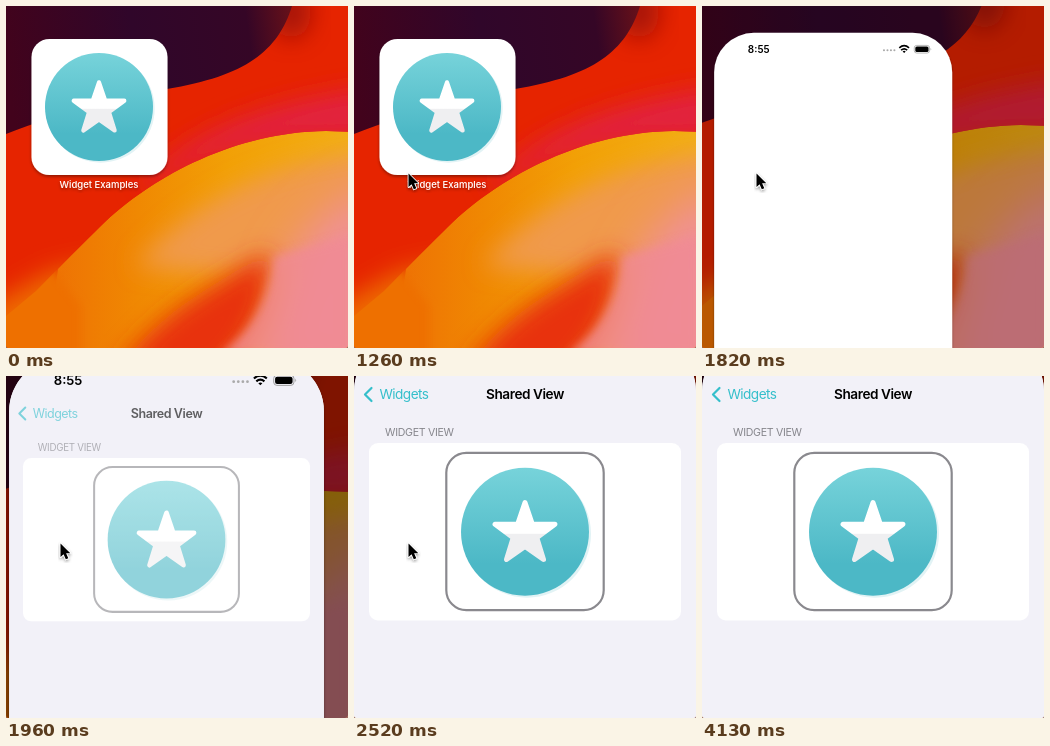
Recreate the animation shown at these times as an HTML page. Size 342 by 342 pixels, loop 5.18 s.

```html
<!DOCTYPE html>
<html lang="en">
<head>
<meta charset="utf-8">
<title>Widget launch</title>
<style>
  html, body { margin: 0; width: 100%; height: 100%; overflow: hidden; background: #77707a; }
  svg { display: block; width: 100vw; height: 100vh; border-radius: 0 0 3px 3px; }
  text { font-family: Inter, "Liberation Sans", sans-serif; }
  .title { font-size: 13.6px; font-weight: 600; letter-spacing: -.45px; }
  .back { font-size: 13.6px; letter-spacing: -.55px; fill: #35bfcb; }
  .section { font-size: 10.6px; letter-spacing: -.3px; fill: #85858b; }
  .clock { font-size: 14.3px; font-weight: 600; }
  .label { font-size: 9.5px; font-weight: 500; fill: #fff; }
</style>
</head>
<body>
<svg viewBox="0 0 342 342">
  <defs>
    <filter id="blur5" x="-50%" y="-50%" width="200%" height="200%"><feGaussianBlur stdDeviation="5"/></filter>
    <filter id="blur12" x="-50%" y="-50%" width="200%" height="200%"><feGaussianBlur stdDeviation="12"/></filter>
    <filter id="blur22" x="-60%" y="-60%" width="220%" height="220%"><feGaussianBlur stdDeviation="22"/></filter>
    <filter id="shadow" x="-20%" y="-20%" width="140%" height="140%">
      <feDropShadow dx="0" dy="1.5" stdDeviation="1.5" flood-opacity=".4"/>
    </filter>
    <linearGradient id="night" gradientUnits="userSpaceOnUse" x1="0" y1="60" x2="285" y2="20">
      <stop offset="0" stop-color="#42031c"/>
      <stop offset=".45" stop-color="#30062a"/>
      <stop offset=".85" stop-color="#350626"/>
      <stop offset="1" stop-color="#64101a"/>
    </linearGradient>
    <linearGradient id="dune" gradientUnits="userSpaceOnUse" x1="40" y1="0" x2="342" y2="0">
      <stop offset="0" stop-color="#ee7004"/>
      <stop offset=".3" stop-color="#f08802"/>
      <stop offset=".6" stop-color="#f2a006"/>
      <stop offset="1" stop-color="#f2ae14"/>
    </linearGradient>
    <linearGradient id="teal" x2="0" y2="1">
      <stop offset="0" stop-color="#77d3da"/>
      <stop offset=".75" stop-color="#4cb8c6"/>
      <stop offset="1" stop-color="#4cb8c6"/>
    </linearGradient>
    <linearGradient id="starFill" x2="0" y2="1">
      <stop offset=".54" stop-color="#fff"/>
      <stop offset=".56" stop-color="#efeff1"/>
    </linearGradient>
    <path id="hill" d="M30 285C48 267 70 244 100 215C150 169 230 126 320 125L350 126V350H0V310Z"/>
    <clipPath id="hillClip"><use href="#hill"/></clipPath>
    <g id="badge">
      <circle cx="2" cy="2" r="64" fill="#e2f3f5"/>
      <circle r="64" fill="url(#teal)"/>
      <path id="star" fill="url(#starFill)" stroke="url(#starFill)" stroke-width="5" stroke-linejoin="round"/>
    </g>
  </defs>

  <g id="wallpaper">
    <rect x="-40" y="-40" width="440" height="440" fill="#e62400"/>
    <path d="M130 182C185 125 250 100 360 82V132C260 130 200 148 150 178Z" fill="#e2203f" filter="url(#blur12)"/>
    <ellipse cx="285" cy="5" rx="20" ry="28" fill="#8a0a10" opacity=".7" filter="url(#blur12)"/>
    <path d="M-40-40H292L286 0C272 45 240 70 161 83C110 92 60 105 0 128L-40 144Z" fill="url(#night)"/>
    <path d="M-60 325L45 265L120 250V400H-60Z" fill="#ee6a06" filter="url(#blur12)"/>
    <g clip-path="url(#hillClip)">
      <path d="M52 263C70 244 85 230 100 215C150 169 230 126 320 125L350 126V350H40Z" fill="url(#dune)"/>
      <path d="M-20 300L45 262L75 300V360H-20Z" fill="#ee7006" filter="url(#blur5)"/>
      <path d="M130 260C180 200 260 155 370 145V270L240 270Z" fill="#f09a4c" filter="url(#blur12)"/>
      <path d="M250 370C275 290 265 225 375 175V380Z" fill="#f0909a" filter="url(#blur22)"/>
      <path d="M110 365C160 300 200 285 262 245C270 300 240 345 210 370Z" fill="#e83208" filter="url(#blur12)"/>
      <path d="M214 348C246 325 262 295 268 250L345 230V350Z" fill="#f08a94" opacity=".8" filter="url(#blur5)"/>
    </g>
  </g>
  <g id="appIcon">
    <rect x="25.5" y="33" width="136" height="136" rx="18" fill="#fff" filter="url(#shadow)"/>
    <use href="#badge" transform="translate(93 101) scale(.844)"/>
    <text class="label" x="93" y="182" text-anchor="middle" filter="url(#shadow)">Widget Examples</text>
  </g>
  <rect id="dim" width="342" height="342"/>

  <g id="app">
    <rect x="0" y="-41" width="342" height="741" rx="57" fill="#fff" filter="url(#shadow)"/>
    <rect id="page" x="0" y="-41" width="342" height="741" rx="57" fill="#f2f1f8"/>
    <text class="clock" x="64" y="-12.7" text-anchor="middle">8:55</text>
    <g fill="#aaa">
      <circle cx="244" cy="-16" r="1.5"/><circle cx="249" cy="-16" r="1.5"/>
      <circle cx="254" cy="-16" r="1.5"/><circle cx="259" cy="-16" r="1.5"/>
    </g>
    <g fill="none" stroke="#000" stroke-width="2.4">
      <path d="M266-19.5Q273-25.5 280-19.5M268.6-16.3Q273-20 277.4-16.3"/>
      <path d="M273-12L270.8-14.4Q273-16 275.2-14.4Z" fill="#000" stroke="none"/>
    </g>
    <rect x="287.5" y="-23" width="22" height="11" rx="3.5" fill="none" stroke="#999"/>
    <rect x="289" y="-21.5" width="19" height="8" rx="2.3"/>
    <path d="M311-19.5q2 2 0 4z" fill="#999"/>
    <g id="content">
      <path d="M17.5 12L11 18.5L17.5 25" fill="none" stroke="#35bfcb" stroke-width="2.2" stroke-linecap="round" stroke-linejoin="round"/>
      <text class="back" x="25.5" y="23.3">Widgets</text>
      <text class="title" x="171" y="23.3" text-anchor="middle">Shared View</text>
      <text class="section" x="31" y="59.8">WIDGET VIEW</text>
    </g>
    <rect x="15" y="67" width="312" height="177.5" rx="9" fill="#fff"/>
    <g id="widget">
      <rect x="92.3" y="76.8" width="157.4" height="157.4" rx="20" fill="#fff" stroke="#8a898e" stroke-width="2.2"/>
      <use href="#badge" x="171" y="155.7"/>
    </g>
  </g>

  <path id="cursor" d="M0 0V13.6L3.1 10.7L5.3 15.8L7.8 14.7L5.6 9.8H9.8Z" stroke="#fff" stroke-width="1.6" paint-order="stroke" stroke-linejoin="round" filter="url(#shadow)"/>
</svg>
<script>
const LOOP = 5180, STEP = 70, LAUNCH = 1820, SETTLED = 2520;
const get = id => document.getElementById(id);
const clamp = v => Math.min(1, Math.max(0, v));
const mix = (a, b, k) => a + (b - a) * k;
const show = (id, on) => get(id).setAttribute('visibility', on ? 'visible' : 'hidden');
const place = (id, x, y, s = 1) => get(id).setAttribute('transform', `translate(${x} ${y}) scale(${s})`);
const fade = (id, v) => get(id).setAttribute('opacity', v);

const corners = Array.from({ length: 10 }, (_, i) => {
  const r = i % 2 ? 12.4 : 31.5, a = i * Math.PI / 5;
  return `${r * Math.sin(a)} ${2.3 - r * Math.cos(a)}`;
});
get('star').setAttribute('d', `M${corners.join('L')}Z`);

const REST = [54.5, 167.5], ENTRY = [256, 317], EXIT = [149, 318];

function drawCursor(t) {
  show('cursor', t >= 350 && t < 4130);
  const arriving = 1 - (1 - clamp((t - 350) / 420)) ** 2;
  const leaving = clamp((t - 3780) / 280) ** 1.4;
  const [from, to, k] = t < 3850 ? [ENTRY, REST, arriving] : [REST, EXIT, leaving];
  place('cursor', mix(from[0], to[0], k), mix(from[1], to[1], k));
}

function drawLaunch(t) {
  const open = t >= LAUNCH;
  show('app', open);
  show('appIcon', !open);
  const n = (t - LAUNCH) / STEP;
  const gap = t >= SETTLED ? 0 : 0.304 * 0.513 ** n;
  const drop = t >= SETTLED ? 0 : 55.4 * 0.607 ** n;
  if (open) place('app', 40 * gap, drop, 1 - gap);
  const content = clamp((t - LAUNCH) / 230);
  fade('page', clamp((t - LAUNCH) / 140));
  fade('content', content);
  fade('widget', content);
  fade('dim', open ? Math.min(0.5, 0.22 + 0.115 * n) : 0);
  if (open) place('wallpaper', -14, -11 - 2 * Math.min(n, 3), 1.04);
  else place('wallpaper', 0, 0);
}

function frame(now) {
  const t = Math.floor((now % LOOP) / STEP) * STEP;
  drawCursor(t);
  drawLaunch(t);
}

const start = performance.now();
(function tick() {
  frame(performance.now() - start);
  requestAnimationFrame(tick);
})();
</script>
</body>
</html>
```
